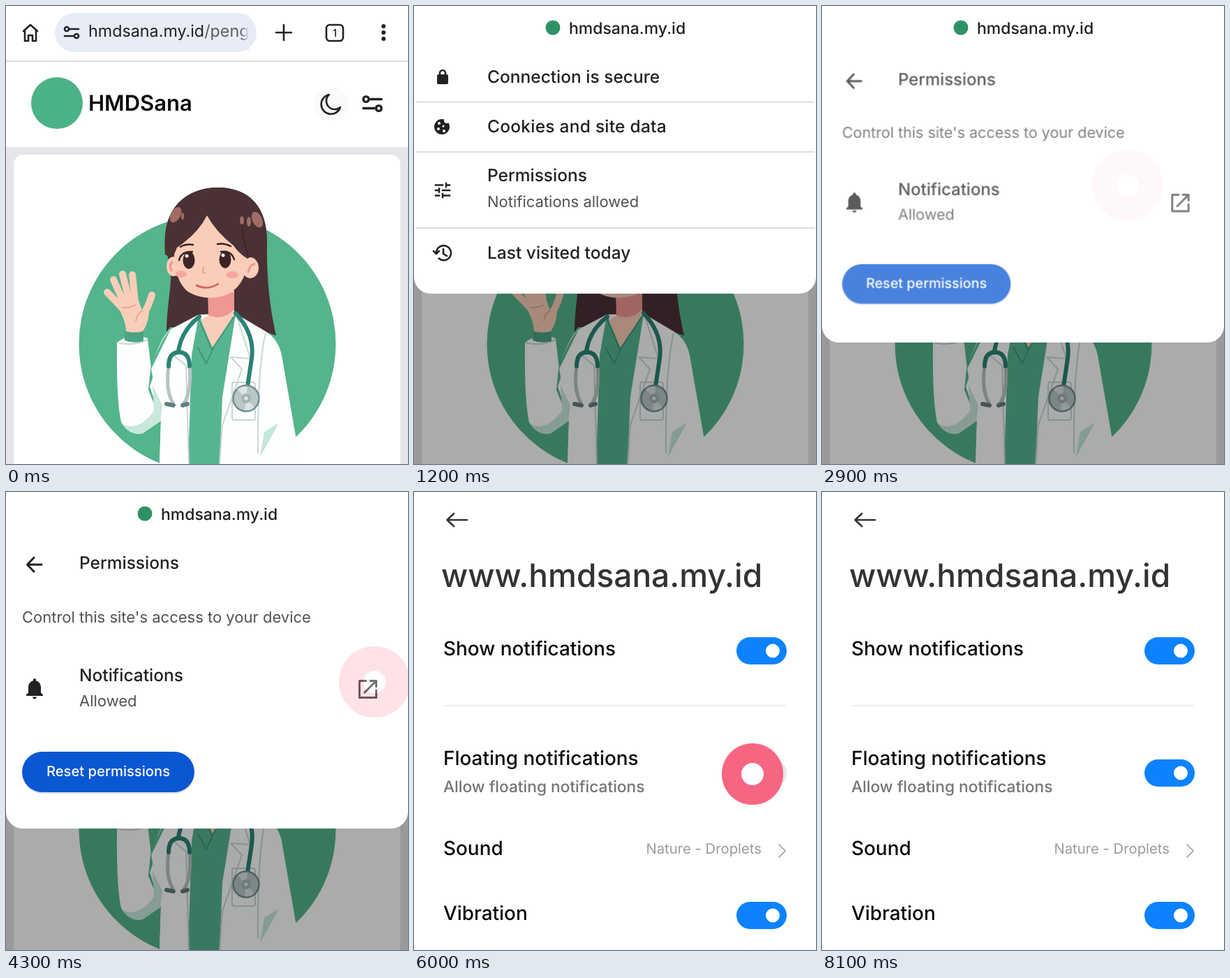
These frames come from a looping animation (576 by 656 pixels, 8200 ms). An HTML page:

```html
<!DOCTYPE html>
<html lang="en">
<head>
<meta charset="utf-8">
<title>Notification settings</title>
<style>
html, body { margin: 0; width: 100%; height: 100%; overflow: hidden; background: #fff; }
svg { display: block; width: 100vw; height: 100vh; }
text { font-family: Inter, "Noto Sans", sans-serif; font-weight: 500; fill: #202124; text-rendering: geometricPrecision; }
.item { font-size: 24.5px; }
.note { font-size: 22px; font-weight: 400; fill: #505154; }
.row { font-size: 27.9px; fill: #0b0b0b; }
.line { fill: none; stroke: #202124; stroke-width: 2.6; stroke-linecap: round; stroke-linejoin: round; }
.skin { fill: none; stroke: #f9cdb8; stroke-width: 10; stroke-linecap: round; }
.crease { fill: none; stroke: #cbd6d3; stroke-width: 2; stroke-linejoin: round; }
.teal { fill: none; stroke: #2a8373; stroke-width: 6; stroke-linecap: round; }
.ring { fill: #f76582; }
.dot { fill: #fff; }

/* 1% of the loop is 82 ms */
.dim, .sheet, .panel, .main, .sub, .settings, .tap, .ring, .track, .knob {
  animation: 8.2s linear infinite both;
}
.dim { animation-name: dim; }
.sheet { animation-name: drop; }
.panel { animation-name: grow; }
.main { animation-name: leave; }
.sub { animation-name: enter; transform-origin: 288px 263px; }
.settings { animation-name: open; }
.track { animation-name: track; }
.knob { animation-name: knob; }
.tap { animation-name: tap; animation-delay: var(--at); }
.ring { animation-name: ring; animation-delay: var(--at); }

@keyframes dim {
  0%, 10.12% { opacity: 0; }
  10.98% { opacity: .1; animation-timing-function: ease-out; }
  14.02%, 100% { opacity: .33; }
}
@keyframes drop {
  0%, 10.12% { transform: translateY(-412px); opacity: 0; }
  10.98% { transform: translateY(-343px); opacity: .68; animation-timing-function: ease-out; }
  14.02%, 100% { transform: none; opacity: 1; }
}
@keyframes grow {
  0%, 33.05% { transform: none; animation-timing-function: ease-out; }
  35.2%, 100% { transform: translateY(70px); }
}
@keyframes leave {
  0%, 33.05% { opacity: 1; }
  34.4%, 100% { opacity: 0; }
}
@keyframes enter {
  0%, 33.8% { opacity: 0; transform: scale(.95); }
  35.37% { opacity: .74; transform: scale(.978); }
  36.7%, 100% { opacity: 1; transform: none; }
}
@keyframes open {
  0%, 54.3% { opacity: 0; transform: translateX(40px); animation-timing-function: ease-out; }
  57.9%, 100% { opacity: 1; transform: none; }
}
@keyframes track {
  0%, 73.8% { fill: #e4e4e7; }
  76.4%, 100% { fill: #0d82ff; }
}
@keyframes knob {
  0%, 73.8% { transform: translateX(-32px); animation-timing-function: ease-in-out; }
  76.4%, 100% { transform: none; }
}
@keyframes tap {
  0% { opacity: 0; }
  .8%, 4.27% { opacity: 1; }
  6.83%, 100% { opacity: 0; }
}
@keyframes ring {
  0% { transform: scale(.3); }
  3.17% { transform: scale(.83); }
  4.27% { transform: scale(1); }
  6.83%, 100% { transform: scale(.96); }
}
</style>
</head>
<body>
<svg viewBox="0 0 576 656" preserveAspectRatio="none">
  <defs>
    <g id="sliders" class="line">
      <circle cx="-7" cy="-5" r="3"/><path d="M-2 -5H10"/>
      <circle cx="7" cy="5" r="3"/><path d="M-10 5H2"/>
    </g>
    <linearGradient id="fade" x1="0" x2="1">
      <stop offset="0" stop-color="#e8ecf6" stop-opacity="0"/>
      <stop offset="1" stop-color="#e8ecf6"/>
    </linearGradient>
    <clipPath id="field"><path d="M70 10H348V66H70z"/></clipPath>
    <clipPath id="card"><path d="M11 213H565V656H11z"/></clipPath>
  </defs>

  <!-- browser bar -->
  <rect width="576" height="656" fill="#fff"/>
  <path class="line" d="M25 36L35 27L45 36M27 35V50H32V42H38V50H43V35"/>
  <rect x="70" y="10" width="289" height="56" rx="28" fill="#e8ecf6"/>
  <use href="#sliders" x="94" y="38"/>
  <g clip-path="url(#field)" font-size="23.3">
    <text x="118" y="44" style="font-weight:400">hmdsana.my.id<tspan fill="#5b5d63">/peng</tspan></text>
    <rect x="336" y="12" width="12" height="52" fill="url(#fade)"/>
  </g>
  <path class="line" d="M387 38H409M398 27V49"/>
  <rect class="line" x="459" y="27" width="24" height="23" rx="5"/>
  <text x="471" y="44" font-size="15" text-anchor="middle">1</text>
  <g fill="#202124"><circle cx="541" cy="29" r="3"/><circle cx="541" cy="38" r="3"/><circle cx="541" cy="47" r="3"/></g>
  <path d="M0 79H576" stroke="#dcdde0" stroke-width="2"/>

  <!-- site header -->
  <circle cx="73" cy="139" r="37" fill="#4bb186"/>
  <text x="118" y="150" font-size="31" style="font-weight:600;fill:#0a0a0a">HMDSana</text>
  <circle cx="466" cy="140" r="24" fill="#fafafa"/>
  <path class="line" d="M463 127A14 14 0 1 0 479 145A12 12 0 0 1 463 127z"/>
  <use href="#sliders" transform="translate(525 140) scale(1.3)"/>
  <rect y="202" width="576" height="454" fill="#e5e5ea"/>
  <rect x="11" y="213" width="554" height="470" rx="14" fill="#fff"/>

  <!-- doctor -->
  <g clip-path="url(#card)">
    <circle cx="288.5" cy="484" r="184" fill="#54b48b"/>
    <path d="M228 345C224 290 258 260 303 260C348 260 374 288 374 335C373 400 380 440 387 472L350 460H235L230 467C230 430 238 400 236 375z" fill="#4a3135"/>

    <!-- coat, scrubs -->
    <path d="M276 442L236 463Q222 472 208 520L203 476Q180 466 159 482Q158 565 165 596Q177 616 196 612L222 594L220 656H422L395 500Q390 477 372 466L328 440z" fill="#fdfefe"/>
    <path d="M208 520L236 463Q222 477 207 520L204 550L222 594Z" fill="#54b48b"/>
    <path d="M230 475L206 545L222 594L220 656H262L268 500z" fill="#fdfefe"/>
    <path d="M210 543L224 572L221 594L196 612Q178 616 167 599Q190 610 212 580z" fill="#c8e8dc"/>
    <path d="M391 597L364 646L370 610z" fill="#c5e6da"/>
    <path d="M276 444L266 500L261 656H306L310 560L329 442L296 470z" fill="#57b491"/>
    <path d="M290 408H327V442L296 490L279 450L290 443z" fill="#f9cdb8"/>
    <path d="M289 410H327V434Q312 452 290 443z" fill="#ee9793"/>
    <path d="M277 450L295 492L328 443M274 488L287 512L298 488" fill="none" stroke="#3f9878" stroke-width="2"/>
    <path class="crease" d="M268 448L240 500L258 515L262 656M330 442L350 505L322 503L338 520L310 600L306 656M372 468Q360 520 361 640M160 482Q180 488 203 478"/>
    <rect class="crease" x="324" y="539" width="33" height="54" rx="3"/>

    <!-- stethoscope -->
    <path class="teal" d="M277 445Q250 466 247 496M329 440Q357 470 352 505L346 545"/>
    <path d="M233 516Q228 552 240 570M263 516Q266 556 254 570" fill="none" stroke="#b7c3c4" stroke-width="5"/>
    <path class="teal" d="M233 516Q233 496 248 496Q263 496 263 516"/>
    <path d="M230 570L240 572M253 572L260 570" stroke="#647d7f" stroke-width="6" stroke-linecap="round"/>
    <circle cx="344" cy="562" r="18.5" fill="#b9c7c7" stroke="#6f8f8e" stroke-width="2.5"/>
    <path d="M344 562L332 549A18 18 0 0 1 346 545zM344 562L356 575A18 18 0 0 1 342 579z" fill="#dbe3e3"/>
    <circle cx="344" cy="562" r="7" fill="#a2b5b5"/><circle cx="344" cy="562" r="2.5" fill="#e6ecec"/>

    <!-- hand -->
    <path d="M170 466Q183 461 197 466V480Q183 484 170 479z" fill="#4aa383"/>
    <path class="skin" d="M145 410L166 432M154 392L170 428M167 384L177 424M181 385L185 424M209 414Q201 441 190 447"/>
    <path d="M159 428Q176 414 190 422L195 436L205 430Q206 452 196 466Q183 469 172 466Q172 452 159 428z" fill="#f9cdb8"/>
    <path d="M167 432Q176 433 186 428M186 452Q187 440 196 436" fill="none" stroke="#e5a290" stroke-width="1.8"/>

    <!-- face -->
    <g fill="#f9cdb8">
      <ellipse cx="240" cy="373" rx="10" ry="14"/><ellipse cx="350" cy="375" rx="12" ry="15"/>
      <path d="M241 345Q250 300 288 298Q340 305 347 350Q348 395 320 412Q290 425 262 410Q240 395 241 345z"/>
    </g>
    <path d="M238 380Q232 372 239 366M347 382Q350 368 357 370" fill="none" stroke="#ee9793" stroke-width="3"/>
    <path d="M228 356C223 290 260 260 303 260C350 260 374 288 374 340L372 368Q358 352 346 362Q333 354 326 343Q302 325 288 300Q275 326 245 346Q240 360 236 360Z" fill="#4a3135"/>
    <path d="M338 310Q340 340 347 358" fill="none" stroke="#36222a" stroke-width="1.5"/>
    <g fill="#a06d64">
      <ellipse cx="243" cy="299" rx="7" ry="12" transform="rotate(28 243 299)"/>
      <ellipse cx="253" cy="301" rx="2" ry="5"/>
      <ellipse cx="338" cy="307" rx="3" ry="6"/><ellipse cx="348" cy="309" rx="3" ry="7"/>
      <ellipse cx="360" cy="306" rx="7" ry="12" transform="rotate(-25 360 306)"/>
    </g>
    <g fill="#f5a7a0"><ellipse cx="251" cy="384" rx="8" ry="5"/><ellipse cx="324" cy="385" rx="9" ry="5"/></g>
    <g fill="#3c2324"><ellipse cx="262" cy="364" rx="8.5" ry="12.5"/><ellipse cx="314" cy="363" rx="8.5" ry="12.5"/></g>
    <g fill="#fff"><circle cx="259" cy="358" r="2.5"/><circle cx="311" cy="357" r="2.5"/></g>
    <path d="M248 364Q251 351 267 352M308 352Q323 350 327 363M250 345Q258 340 268 342M303 341Q312 339 322 344" fill="none" stroke="#3c2324" stroke-width="2.4" stroke-linecap="round"/>
    <path d="M284 374Q279 382 286 383" fill="none" stroke="#e59d8d" stroke-width="2"/>
    <path d="M273 400Q288 408 304 398" fill="none" stroke="#d8605f" stroke-width="2.6" stroke-linecap="round"/>
  </g>

  <rect class="dim" width="576" height="656"/>

  <!-- site info sheet -->
  <g class="sheet">
    <rect class="panel" y="-110" width="576" height="522" rx="24" fill="#fff"/>
    <circle cx="199" cy="31" r="10.5" fill="#2f9166"/>
    <text x="222" y="40" font-size="23">hmdsana.my.id</text>
    <g class="main">
      <path d="M2 137.5H574M2 209H574M2 318H574" stroke="#dedee2" stroke-width="2"/>
      <rect x="33" y="98" width="16" height="14" rx="2" fill="#202124"/>
      <path class="line" d="M37 98V96A4 4 0 0 1 45 96V98"/>
      <text class="item" x="105" y="110">Connection is secure</text>
      <circle cx="40" cy="173" r="11" fill="#202124"/>
      <g fill="#fff">
        <circle cx="47" cy="164" r="4"/><circle cx="36" cy="168" r="2"/><circle cx="35" cy="176" r="2"/>
        <circle cx="43" cy="179" r="2"/><circle cx="42" cy="172" r="1.5"/>
      </g>
      <text class="item" x="105" y="181" letter-spacing=".25">Cookies and site data</text>
      <path transform="translate(26 249) scale(1.25)" fill="#202124" d="M3 17v2h6v-2H3zM3 5v2h10V5H3zm10 16v-2h8v-2h-8v-2h-2v6h2zM7 9v2H3v2h4v2h2V9H7zm14 4v-2H11v2h10zm-6-4h2V7h4V5h-4V3h-2v6z"/>
      <text class="item" x="105" y="251">Permissions</text>
      <text class="note" x="105" y="288">Notifications allowed</text>
      <path class="line" d="M32 354A10.5 10.5 0 1 1 35.5 361.5M28 351L32 355L36 351M42 348V355L47 358"/>
      <text class="item" x="105" y="362">Last visited today</text>
    </g>
    <g class="sub">
      <path class="line" d="M51 104H31M40 94L30.5 104L40 114" style="stroke-width:3"/>
      <text class="item" x="105" y="110">Permissions</text>
      <text class="note" x="23" y="187">Control this site's access to your device</text>
      <path transform="translate(23 263.5) scale(1.5)" fill="#202124" d="M12 22c1.1 0 2-.9 2-2h-4c0 1.1.9 2 2 2zm6-6v-5c0-3.1-1.6-5.6-4.5-6.3V4a1.5 1.5 0 0 0-3 0v.7C7.6 5.4 6 7.9 6 11v5l-2 2v1h16v-1z"/>
      <text class="item" x="105" y="271">Notifications</text>
      <text class="note" x="105" y="307">Allowed</text>
      <path class="line" d="M517 270.5H506.5V294.5H530.5V283M521 270.5H530.5V280M530 271L513 288" style="stroke:#505154;stroke-linecap:butt;stroke-width:3"/>
      <rect x="23" y="374" width="247" height="58" rx="29" fill="#000" opacity=".12"/>
      <rect x="23" y="372" width="247" height="58" rx="29" fill="#0a57d3"/>
      <text x="146.5" y="407" font-size="20.2" text-anchor="middle" style="fill:#fff">Reset permissions</text>
    </g>
  </g>

  <!-- system settings -->
  <g class="settings">
    <rect x="-60" width="700" height="656" fill="#fff"/>
    <path class="line" d="M76 40H48M57 31L47.5 40L57 49" style="stroke:#333"/>
    <text x="39" y="136" font-size="46.1" style="fill:#333">www.hmdsana.my.id</text>
    <text class="row" x="42" y="234">Show notifications</text>
    <path d="M43 306H534" stroke="#ececec" stroke-width="2"/>
    <text class="row" x="42" y="391">Floating notifications</text>
    <text x="42" y="430" font-size="22.7" style="fill:#757575">Allow floating notifications</text>
    <text class="row" x="42" y="520">Sound</text>
    <text x="498" y="518" font-size="20.3" text-anchor="end" style="fill:#9b9b9b;font-weight:400">Nature - Droplets</text>
    <path class="line" d="M523 505L532 514L523 523" style="stroke:#b0b0b0;stroke-width:2"/>
    <text class="row" x="42" y="613">Vibration</text>
    <g fill="#0d82ff">
      <rect x="462" y="208" width="72" height="39" rx="19.5"/>
      <rect class="track" x="462" y="383" width="72" height="39" rx="19.5"/>
      <rect x="462" y="587" width="72" height="39" rx="19.5"/>
    </g>
    <g fill="#fff">
      <circle cx="514" cy="227.5" r="10"/>
      <circle class="knob" cx="514" cy="402.5" r="10"/>
      <circle cx="514" cy="606.5" r="10"/>
    </g>
  </g>

  <!-- taps -->
  <g transform="translate(101 38)" style="--at:470ms">
    <g class="tap"><circle class="ring" r="53"/><circle class="dot" r="16"/></g>
  </g>
  <g transform="translate(438 257)" style="--at:2350ms">
    <g class="tap"><circle class="ring" r="53"/><circle class="dot" r="16"/></g>
  </g>
  <g transform="translate(528 272)" style="--at:3780ms">
    <g class="tap"><circle class="ring" r="53"/><circle class="dot" r="16"/></g>
  </g>
  <g transform="translate(485 404)" style="--at:5740ms">
    <g class="tap"><circle class="ring" r="53"/><circle class="dot" r="16"/></g>
  </g>
</svg>
</body>
</html>
```
